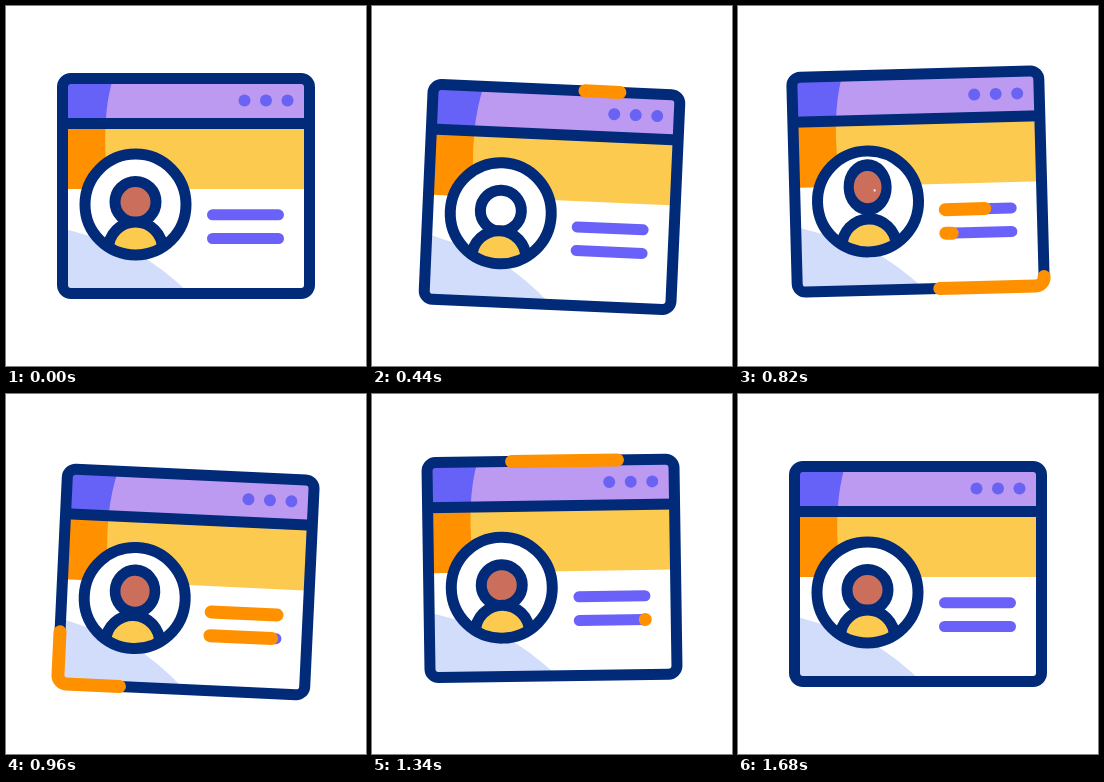
Write an HTML page that moves like this. It is 360 px wide and 360 px high and loops after 1880 ms.

```html
<!DOCTYPE html>
<html lang="en">
<head>
<meta charset="utf-8">
<title>Profile window</title>
<style>
  html, body { margin: 0; width: 100%; height: 100%; overflow: hidden; background: #fff; }
  svg { display: block; width: 100vw; height: 100vh; }
  .line { fill: none; stroke: #012b78; stroke-width: 11; }
  .bar { stroke: #6a62f8; stroke-width: 11; stroke-linecap: round; }
  .spark { fill: none; stroke: #ff9100; stroke-width: 13; stroke-linecap: round; }
</style>
</head>
<body>
<svg viewBox="0 0 360 360">
  <defs>
    <clipPath id="frame"><rect x="56.5" y="72.5" width="247" height="215" rx="8.5"/></clipPath>
    <clipPath id="disc"><circle cx="129.5" cy="198.5" r="50.5"/></clipPath>
  </defs>
  <g id="card">
    <g clip-path="url(#frame)">
      <rect x="56" y="72" width="248" height="216" fill="#fff"/>
      <path d="M56 222L80 229Q130 236 184 288H56Z" fill="#d2dcfb"/>
      <rect x="56" y="72" width="248" height="46" fill="#bc9af2"/>
      <rect x="56" y="118" width="248" height="65" fill="#fdca50"/>
      <path d="M56 72H107Q101 92 99.5 118H56Z" fill="#6662f7"/>
      <path d="M56 118H99.5Q98 150 103 183H56Z" fill="#ff9100"/>
    </g>
    <g fill="#6a62f2">
      <circle cx="238.5" cy="94.5" r="6"/>
      <circle cx="260" cy="94.5" r="6"/>
      <circle cx="281.5" cy="94.5" r="6"/>
    </g>
    <path class="line" d="M56.5 117.5H303.5"/>
    <rect class="line" x="56.5" y="72.5" width="247" height="215" rx="8.5"/>
    <circle cx="129.5" cy="198.5" r="50.5" fill="#fff"/>
    <g clip-path="url(#disc)">
      <g id="head">
        <circle r="20.5" fill="#cb6f5c"/>
        <circle id="hole" fill="#fff"/>
        <circle class="line" r="20.5"/>
      </g>
      <circle class="line" cx="129.5" cy="243" r="27" style="fill: #fdca50"/>
    </g>
    <circle class="line" cx="129.5" cy="198.5" r="50.5"/>
    <path class="bar" d="M206.5 208.8H272.5M206.5 232.5H272.5"/>
    <line class="spark" id="bar1" y1="208.8" y2="208.8"/>
    <line class="spark" id="bar2" y1="232.5" y2="232.5"/>
    <rect class="spark" id="runner" x="56.5" y="72.5" width="247" height="215" rx="8.5"/>
  </g>
</svg>
<script>
const LOOP = 1880;
const $ = id => document.getElementById(id);
const set = (el, attrs) => { for (const k in attrs) el.setAttribute(k, attrs[k]); };
const show = (el, on) => { el.style.display = on ? '' : 'none'; };

// Sine ease from 0 to 1 between two times.
const ease = (t, from, to) => {
  const u = Math.min(1, Math.max(0, (t - from) / (to - from)));
  return (1 - Math.cos(Math.PI * u)) / 2;
};

// Swings from one turning point [time, value] to the next.
const swing = (...turns) => t => turns.slice(1).reduce(
  (sum, [end, value], i) => sum + (value - turns[i][1]) * ease(t, turns[i][0], end),
  turns[0][1]);

const lift = swing([240, 0], [440, 11], [660, -18.5], [970, 8], [1200, -7], [1680, 0]);
const tilt = swing([300, 0], [545, 4.1], [760, -2.2], [1040, 3.8], [1380, -1], [1680, 0]);
const hop = swing([540, 0], [660, 3], [835, -12], [1060, 1], [1300, 0]);

const card = $('card'), head = $('head'), runner = $('runner');
const around = runner.getTotalLength();

function drawHead(t) {
  const y = hop(t), s = y * 0.0065;
  set(head, { transform: `translate(129.5 ${196 + y}) scale(${1 + s} ${1 - s})` });
  const open = ease(t, 250, 370) - ease(t, 680, 850);
  set($('hole'), { r: 15.5 * open, cx: 8 * (1 - open), cy: 3.5 * (1 - open) });
}

function drawRunner(t) {
  const from = 143 + 850 * ease(t, 430, 1400);
  const len = 110 * (ease(t, 380, 540) - ease(t, 1310, 1560));
  show(runner, len > 0.5);
  set(runner, {
    'stroke-dasharray': `${len} ${around - len}`,
    'stroke-dashoffset': -(from % around)
  });
}

function drawBar(el, t) {
  const tip = ease(t, 697, 917), tail = ease(t, 968, 1266);
  show(el, tip > tail);
  set(el, { x1: 206.5 + 66 * tail, x2: 206.5 + 66 * tip });
}

function draw(t) {
  set(card, { transform: `translate(0 ${lift(t)}) rotate(${tilt(t)} 180 180)` });
  drawHead(t);
  drawRunner(t);
  drawBar($('bar1'), t);
  drawBar($('bar2'), t - 80);
}

const start = performance.now();
function tick() {
  draw((performance.now() - start) % LOOP);
  requestAnimationFrame(tick);
}
tick();
</script>
</body>
</html>
```
